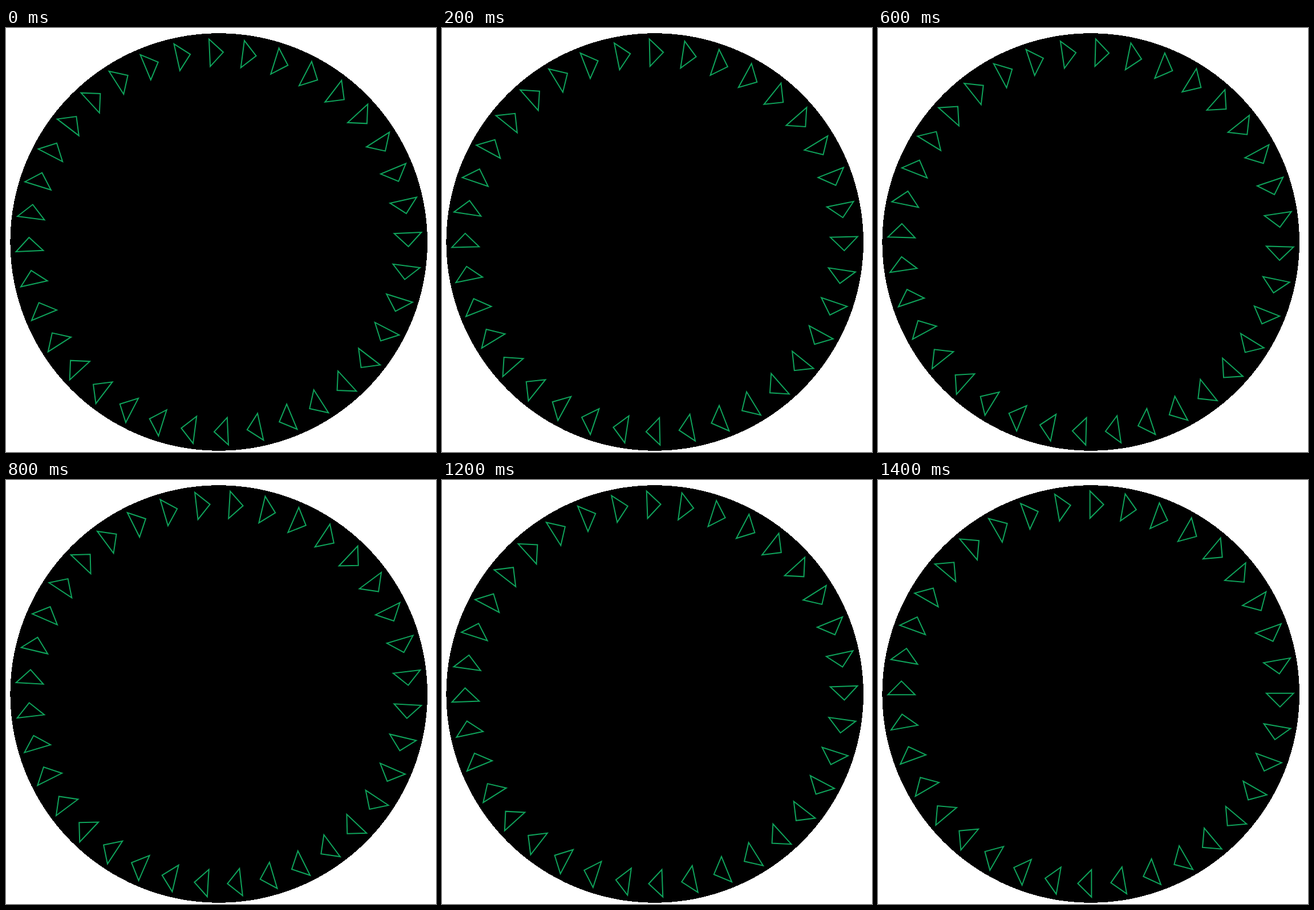
Recreate the animation shown at these times as an HTML page. Size 754x743 px, loop 1.6 s.

```html
<!DOCTYPE html>
<html>
<head>
<meta charset="utf-8">
<style>
  html, body { margin: 0; width: 100%; height: 100%; overflow: hidden; background: #fff; }
  svg { display: block; }
</style>
</head>
<body>
<svg width="754" height="743" viewBox="0 0 754 743">
  <circle cx="373.2" cy="375" r="365.8" shape-rendering="crispEdges"/>
  <g id="ring" fill="none" stroke="#0fa35b" stroke-width="2"></g>
</svg>
<script>
  const STEP = 200;
  // Ring rotation in degrees, held for one step each
  const ANGLES = [-2.58, -1.35, 0, 1.57, 3.4, 5.32, 7.86, 9.94];
  const COUNT = 36;
  const ring = document.getElementById('ring');

  ring.innerHTML = Array.from({ length: COUNT }, (_, i) =>
    `<path d="M-1-355.8V-308L23-331.9Z" transform="rotate(${i * 360 / COUNT})"/>`).join('');

  function draw(now) {
    const angle = ANGLES[Math.floor(now / STEP) % ANGLES.length];
    ring.setAttribute('transform', `translate(373 375) rotate(${angle})`);
  }

  const start = performance.now();
  function tick() {
    draw(performance.now() - start);
    requestAnimationFrame(tick);
  }
  tick();
</script>
</body>
</html>
```
